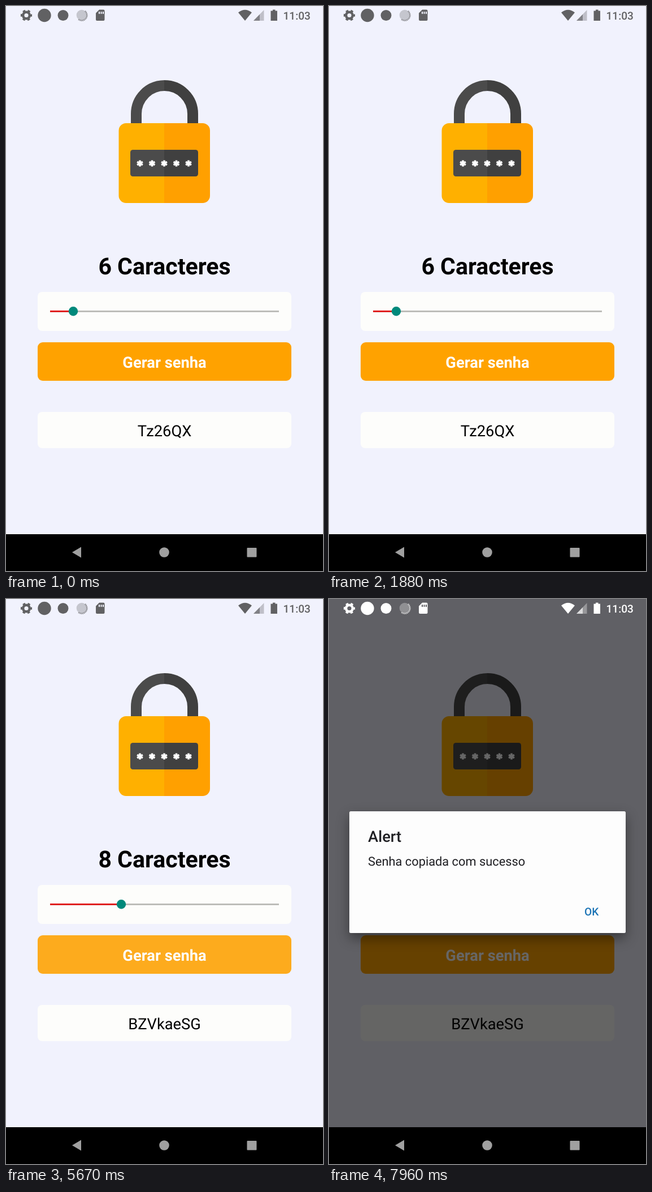
These frames come from a looping animation (561x998 px, 8000 ms). An HTML page:

```html
<!DOCTYPE html>
<html lang="pt-BR">
<head>
<meta charset="utf-8">
<title>Gerador de senha</title>
<style>
  @property --x { syntax: "<length>"; inherits: true; initial-value: 119px; }

  html, body { margin: 0; width: 100%; height: 100%; overflow: hidden; background: #f1f2fd; }
  svg { display: block; width: 100%; height: 100%; }
  text { font-family: Roboto, sans-serif; text-rendering: geometricPrecision; }
  .mid { text-anchor: middle; }
  .bold { font-weight: 700; }
  .medium { font-weight: 500; }
  .title { font-size: 41px; }
  .label { font-size: 27.3px; }
  .small { font-size: 19.1px; }
  .card { fill: #fdfdfb; }

  .slider, .button, .dim, .dialog, .status { animation: 8s linear infinite; }
  .six, .seven, .eight, .before, .after { animation: 8s step-end infinite; }

  .slider { animation-name: drag; }
  .slider rect { width: calc(var(--x) - 78px); }
  .slider circle { cx: var(--x); }
  @keyframes drag {
    0%, 49.38% { --x: 119px; }
    55.25% { --x: 173px; }
    60%, 100% { --x: 204px; }
  }

  .six { animation-name: six; }
  .seven { animation-name: seven; }
  .eight { animation-name: eight; }
  @keyframes six { 0% { opacity: 1; } 51.55%, 100% { opacity: 0; } }
  @keyframes seven { 0% { opacity: 0; } 51.55% { opacity: 1; } 56.18%, 100% { opacity: 0; } }
  @keyframes eight { 0% { opacity: 0; } 56.18%, 100% { opacity: 1; } }

  .button { animation-name: press; }
  @keyframes press {
    0%, 66.6% { opacity: 1; animation-timing-function: ease-in-out; }
    68.5%, 68.6% { opacity: .2; animation-timing-function: cubic-bezier(.45, 0, .55, 1); }
    71.75%, 100% { opacity: 1; }
  }

  .before { animation-name: before; }
  .after { animation-name: after; }
  @keyframes before { 0% { opacity: 1; } 68.6%, 100% { opacity: 0; } }
  @keyframes after { 0% { opacity: 0; } 68.6%, 100% { opacity: 1; } }

  .dim { animation-name: dim; }
  @keyframes dim { 0%, 89.56% { opacity: 0; } 93.1%, 100% { opacity: .6; } }

  .dialog { animation-name: appear; }
  .dialog rect { filter: drop-shadow(0 9px 11px rgba(0, 0, 0, .42)); }
  @keyframes appear {
    0%, 89.56% { opacity: 0; animation-timing-function: cubic-bezier(.33, 1, .68, 1); }
    91.56%, 100% { opacity: 1; }
  }

  .status { animation-name: invert; fill: currentColor; }
  @keyframes invert {
    0%, 89.56% { color: #616163; }
    90.6% { color: #4f4f51; }
    93%, 100% { color: #fff; }
  }
</style>
</head>
<body>
<svg viewBox="0 0 561 998" preserveAspectRatio="none">
  <defs>
    <linearGradient id="steel">
      <stop offset=".5" stop-color="#4b4b4b"/>
      <stop offset=".5" stop-color="#404040"/>
    </linearGradient>
    <linearGradient id="gold">
      <stop offset=".5" stop-color="#ffb000"/>
      <stop offset=".5" stop-color="#ffa000"/>
    </linearGradient>
    <path id="star" d="M0-5.6V5.6M-4.9-2.8L4.9 2.8M-4.9 2.8L4.9-2.8" stroke="#fff" stroke-width="3.6"/>
  </defs>

  <rect width="561" height="998" fill="#f1f2fd"/>

  <!-- padlock -->
  <path d="M230.5 210V190.5a50 50 0 0 1 100 0V210" fill="none" stroke="url(#steel)" stroke-width="19"/>
  <rect x="199.5" y="207" width="161.5" height="141" rx="13" fill="url(#gold)"/>
  <rect x="220" y="254" width="120" height="47" rx="4.5" fill="url(#steel)"/>
  <use href="#star" x="237" y="278"/>
  <use href="#star" x="258.5" y="278"/>
  <use href="#star" x="280" y="278"/>
  <use href="#star" x="301.5" y="278"/>
  <use href="#star" x="323" y="278"/>

  <!-- length -->
  <g class="title bold mid">
    <text class="six" x="280.5" y="474">6 Caracteres</text>
    <text class="seven" x="280.5" y="474">7 Caracteres</text>
    <text class="eight" x="280.5" y="474">8 Caracteres</text>
  </g>
  <rect class="card" x="56" y="505" width="449" height="69" rx="8"/>
  <path d="M78 539.3H483" stroke="#b9b9b4" stroke-width="2.8"/>
  <g class="slider">
    <rect x="78" y="537.9" height="2.8" fill="#e21414"/>
    <circle cy="539.3" r="8.2" fill="#00897b"/>
  </g>

  <g class="button">
    <rect x="56" y="594" width="449" height="68" rx="9" fill="#ffa200"/>
    <text class="label bold mid" x="280.5" y="639" fill="#fff">Gerar senha</text>
  </g>

  <!-- password -->
  <rect class="card" x="56" y="717" width="449" height="64" rx="8"/>
  <g class="label mid">
    <text class="before" x="280.5" y="759.5">Tz26QX</text>
    <text class="after" x="280.5" y="759.5">BZVkaeSG</text>
  </g>

  <rect class="dim" width="561" height="933"/>

  <g class="dialog" fill="#1f1f23">
    <rect x="36" y="375" width="489" height="215" rx="2.5" fill="#fdfdfd"/>
    <text class="label medium" x="69" y="429">Alert</text>
    <text x="69" y="471" font-size="21.8">Senha copiada com sucesso</text>
    <text class="small medium" x="452" y="559" fill="#1a73b5">OK</text>
  </g>

  <!-- status bar -->
  <g class="status">
    <g fill="none" stroke="currentColor">
      <circle cx="36" cy="16.5" r="5.8" stroke-width="4.4"/>
      <circle cx="36" cy="16.5" r="8.6" stroke-width="3" stroke-dasharray="4.5 4.506" stroke-dashoffset="2.25"/>
    </g>
    <circle cx="68" cy="16.5" r="11.7"/>
    <circle cx="101" cy="16.5" r="9.5"/>
    <circle cx="134" cy="16" r="9.3" opacity=".3"/>
    <path d="M140 9a9 9 0 0 1-12 14.500" fill="none" stroke="currentColor" stroke-width="2.5" stroke-dasharray="1.5 1" opacity=".75"/>
    <path fill-rule="evenodd" d="M165 6.500h7.500a2 2 0 0 1 2 2V24a2 2 0 0 1-2 2H161a2 2 0 0 1-2-2V12.500ZM164 10v4h2v-4ZM167.500 10v4h2v-4ZM171 10v4h2v-4Z"/>
    <path d="M411 11.500Q423 2 435 11.500L423 26Z"/>
    <path d="M456.500 7V26H438Z" opacity=".35"/>
    <path d="M449 14.700V26H438Z" opacity=".65"/>
    <path d="M472 6.500h4.500V8.500H480V26H468.500V8.500H472Z"/>
    <text class="small medium" x="490.500" y="24">11:03</text>
  </g>

  <!-- navigation bar -->
  <rect y="933" width="561" height="65"/>
  <g fill="#a0a0a0">
    <path d="M117 965L133 955.500V974.500Z"/>
    <circle cx="280" cy="965" r="8.8"/>
    <rect x="426.500" y="957" width="17" height="16.500" rx="1"/>
  </g>
</svg>
</body>
</html>
```
